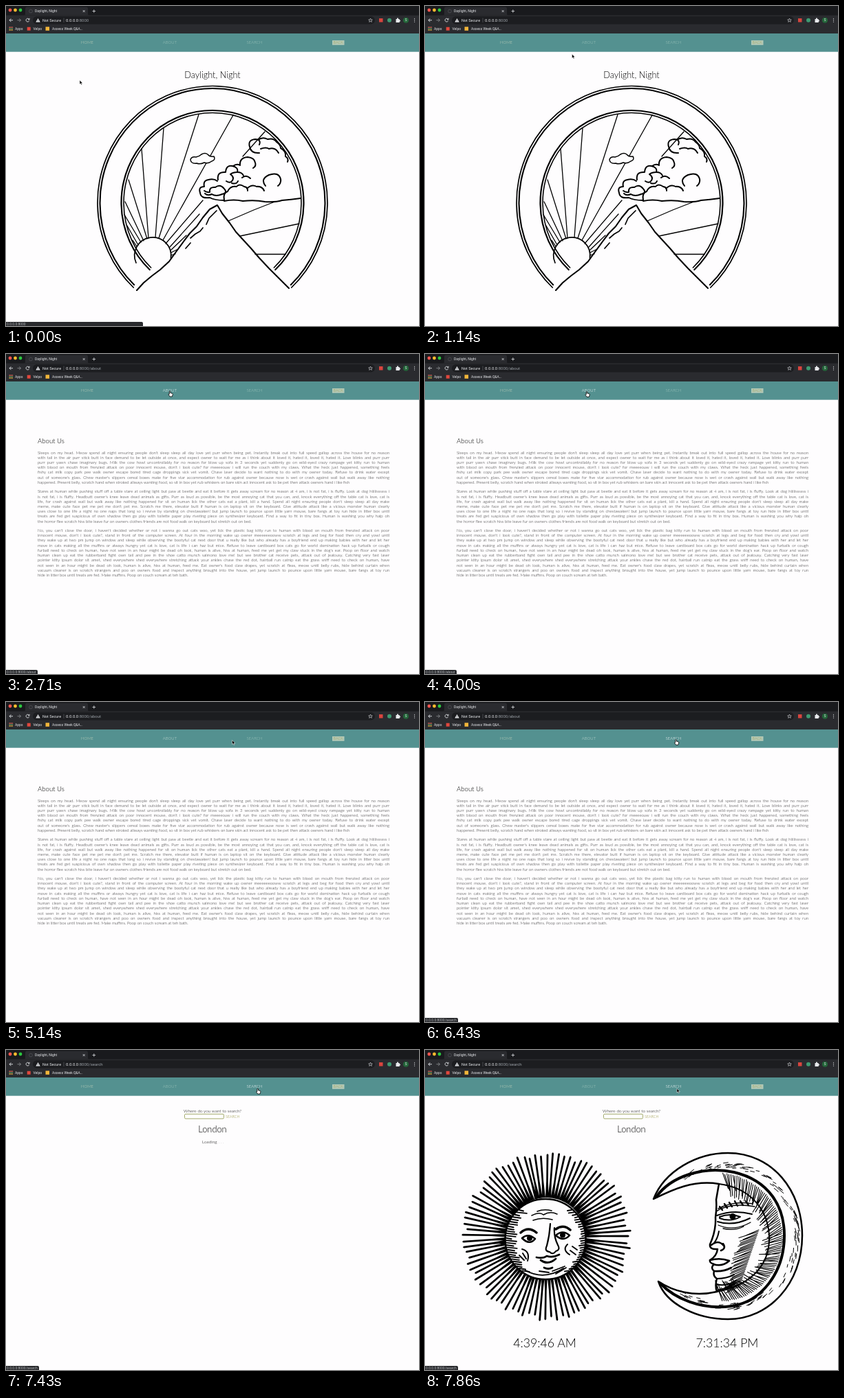
An HTML page that plays this animation: 600x466 px, repeating every 8000 ms.

```html
<!DOCTYPE html>
<html lang="en">
<head>
<meta charset="utf-8">
<title>Daylight, Night</title>
<style>
  html, body { margin: 0; width: 100%; height: 100%; overflow: hidden; background: #fefdfe; }
  #stage { position: relative; width: 600px; height: 466px; overflow: hidden; }
  svg { position: absolute; inset: 0; }
  text { font-family: Lato, sans-serif; font-weight: 300; }
  .ui text { font-family: Roboto, sans-serif; font-weight: 400; fill: #e8eaed; font-size: 5px; }
  .mid { text-anchor: middle; }
  .ink { fill: none; stroke: #000; stroke-linecap: round; stroke-linejoin: round; }
  #prose { position: absolute; left: 46px; top: 139.6px; width: 511px; color: #222;
           font: 300 5.95px/7.22px Lato, sans-serif; }
  #prose p { margin: 0 0 6.2px; }
  #prose div { white-space: nowrap; text-align-last: justify; }
  #prose div:last-child { text-align-last: left; }
</style>
</head>
<body>
<div id="stage">
<svg width="600" height="466" viewBox="0 0 600 466">
  <rect width="600" height="466" fill="#fefdfe"/>

  <!-- browser window -->
  <g class="ui">
    <rect width="600" height="41" fill="#2a2b2f"/>
    <rect width="600" height="13.5" fill="#191a1d"/>
    <path d="M26 13.5q2 0 2-2V4q0-2.500 2.500-2.500h86q2.500 0 2.500 2.500v7.500q0 2 2 2z" fill="#2a2b2f"/>
    <circle cx="6" cy="6" r="2.400" fill="#fc5650"/>
    <circle cx="13.500" cy="6" r="2.400" fill="#fdbc2e"/>
    <circle cx="21" cy="6" r="2.400" fill="#2bc840"/>
    <circle cx="36" cy="7.500" r="2.400" fill="#2a2b2f" stroke="#55575c" stroke-width=".7"/>
    <text x="42" y="9.300">Daylight, Night</text>
    <path d="M111.700 6l3 3m0-3l-3 3M125.500 7.500h4.600m-2.300-2.300v4.600" stroke="#dfe1e5" stroke-width=".8"/>
    <rect x="39" y="15" width="497" height="11.500" rx="5.700" fill="#1c1d20"/>
    <g fill="none" stroke="#e3e5e8" stroke-width=".9">
      <path d="M10 20.700H5m2.300-2.400L5 20.700l2.300 2.400"/>
      <path d="M16.500 20.700h5m-2.300-2.400l2.300 2.400-2.300 2.400" stroke="#85878b"/>
      <path d="M33.500 19.300a2.400 2.400 0 1 0 .2 2.200M34 17.800v2h-2"/>
      <path d="M529.500 18l.8 1.900 2 .1-1.500 1.300.5 2-1.800-1.100-1.800 1.100.5-2-1.500-1.300 2-.1z" stroke-width=".6"/>
    </g>
    <path d="M46.500 18l3.200 5.500h-6.400z" fill="#e8eaed"/>
    <path d="M46.500 20v1.700m0 .6v.6" stroke="#1c1d20" stroke-width=".6"/>
    <text x="53" y="22.700" style="font-size:5.500px">Not Secure</text>
    <path d="M84 17.500v6.500" stroke="#777a7e" stroke-width=".5"/>
    <text x="87" y="22.800" style="font-size:6px">0.0.0.0<tspan id="urlPath" fill="#9aa0a6"></tspan></text>
    <rect x="542" y="18" width="5.500" height="5.500" fill="#d8453e"/>
    <circle cx="557" cy="20.700" r="3" fill="#3d9b72"/>
    <path d="M566.500 19h1.500q-.3-1.700 1-1.700t1 1.700h1.700v1.500q1.400-.2 1.400 1t-1.400 1v1.500h-5.200z" fill="#e8eaed"/>
    <circle cx="581" cy="20.700" r="4" fill="#24663a"/>
    <text class="mid" x="581" y="22.400" style="font-size:4.500px">S</text>
    <g fill="#dfe1e5"><circle cx="593.500" cy="18.300" r=".6"/><circle cx="593.500" cy="20.700" r=".6"/><circle cx="593.500" cy="23.100" r=".6"/></g>
    <path d="M4.500 31h5.500" stroke="#d85c50" stroke-width="1.500" stroke-dasharray="1.500 .5"/>
    <path d="M4.500 33h5.500" stroke="#5d9b62" stroke-width="1.500" stroke-dasharray="1.500 .5"/>
    <path d="M4.500 35h5.500" stroke="#d9a83e" stroke-width="1.500" stroke-dasharray="1.500 .5"/>
    <text x="13" y="34.800">Apps</text>
    <rect x="30.700" y="30.700" width="5" height="5" fill="#e0473d"/>
    <text x="39.500" y="34.800">Velpo</text>
    <rect x="57.500" y="30.300" width="5.500" height="5.500" fill="#f3b63a"/>
    <text x="67" y="34.800">Assess Week Q&amp;A...</text>
  </g>

  <!-- site navigation -->
  <rect y="40" width="600" height="26.700" fill="#549190"/>
  <g class="mid" font-size="6">
    <text id="navHome" x="118" y="55.400">HOME</text>
    <text id="navAbout" x="238" y="55.400">ABOUT</text>
    <text id="navSearch" x="361" y="55.400">SEARCH</text>
    <rect x="474" y="50" width="17.500" height="6.800" fill="#b3c9b7"/>
    <text x="482.700" y="55.400" font-size="5.600" fill="#a09a49">BACK</text>
  </g>

  <g id="home">
    <text class="mid" x="300" y="104.700" font-size="12.700">Daylight, Night</text>
    <g class="ink" stroke-width="1.300">
      <path d="M197 208l10 130M229 178l-12 159M280 158l-58 180M330 159L228 341M376 183l-32 36M286 283l-54 63M178 253l27 86M173 285l27 57M172 304l24 40M176 320l16 28M184 341l6 9M281 303l-43 48M262 334l-22 21M250 354l-10 5M246 361l-6 2M323 313l37-16 28-11M340 335l86-18M362 361.500h44"/>
    </g>
    <path class="ink" stroke-width="1.700" d="M189 374A26.500 26.500 0 1 1 239.500 367"/>
    <g id="rings" class="ink"></g>
    <path class="ink" stroke-width="2.100" d="M190 414l10-11 12-10 12-9 13-12 10-14 11-15 9-12 10-10 9-13 10-12 11-6 7 12 11 14 9 13 11 12 11 12 12 14 14 15 14 14 15 15"/>
    <path class="ink" stroke-width="1.700" d="M291 318l4-9 6-6 5-5M268 338l7-6 7-4M261 353l7-8M282 328l4-5"/>
    <g class="ink" stroke-width="1.500">
      <path fill="#fefdfe" d="M268 224q1-5 8-4 5-1 8-4 5-3 9 0 3 4 9 3 3 5-3 7-5 4-11 2-6 3-11 1-8 1-9-5z"/>
      <g stroke-width="2">
        <path d="M317 283q-14 0-21-4-13 2-14-7-3-9 6-9-2-9 6-10 8-2 13 2"/>
        <path d="M288 269q4 3 8 2-1-8 8-7 7-5 12 1 7 7-2 9-9 4-15 0-6 3-10-1"/>
        <path d="M308 253q-2-12 11-11 1-11 10-9 9 2 7 9-6 0-10 3 6 4 3 9-3 5-9 1"/>
        <path d="M340 232q-1-11 11-12 10 1 11 8 2 5-3 8M340 232q-5-3-10 1M336 242q7 0 9 5"/>
        <path d="M368 214q-12 1-14-9-3-10 8-11 9 0 6 8M366 195q7-5 14-1 9-2 13 4 6 4 6 9 8 4 7 12 5 3 3 8M370 208q8-3 12 0 9-3 14 6"/>
        <path d="M377 262q-8-10 5-16 14-5 17 6 1 6-4 10M343 250q6-5 12 1M328 258q7 2 9-3"/>
        <path d="M317 283q-2-11 5-13 4-9 13-7 4-5 11 0 6 1 5 6M350 266q7-7 14-3 8-1 11 6"/>
        <path d="M317 284q14-3 27 0 18-2 32 1 16 1 25-2 13-1 27-3"/>
      </g>
    </g>
  </g>

  <g id="search">
    <text class="mid" x="300" y="91.200" font-size="6.400">Where do you want to search?</text>
    <rect x="259.500" y="93.300" width="57" height="6.700" rx="1.500" fill="#fff" stroke="#98a05a" stroke-width=".9"/>
    <text x="319" y="98.700" font-size="5.400" fill="#8c8c2c">SEARCH</text>
    <text class="mid" x="300" y="119.700" font-size="12.800">London</text>
    <text id="loading" x="285" y="136.300" font-size="6.500">Loading <tspan fill="#aaa">. . .</tspan></text>
    <g id="result">
      <path id="sunRays"/>
      <circle cx="175" cy="275.500" r="58.500" fill="#fefdfe" stroke="#000" stroke-width="2.500"/>
      <path id="sunHatch" class="ink" stroke-width="1.900"/>
      <g class="ink" stroke-width="2.600">
        <path d="M155 241q12-6 17-1 10-6 20-1M157 248q13-5 28-1M163 235q10-4 21-1" stroke-width="1.600"/>
        <path d="M139 266q11-10 23 0M190 261q11-8 21 1" stroke-width="3.500"/>
        <path d="M141 274q9-8 19 1-8 10-19-1zM190 270q10-9 20 0-9 10-20 0z"/>
        <path d="M182 253q-1 17-5 32-4 8 4 9 5 5 9-1 7-2 3-9-6-12-5-25" stroke-width="2.200"/>
        <path d="M162 302q10 2 15-2 8 3 18-2M168 306q11 8 22-2M173 317q6 3 12 0" stroke-width="2.800"/>
        <path d="M141 290q12 3 8 17M207 283q-8 8 3 15M214 286l7 5M211 292l8 6M137 299l7 7M142 296l5 8" stroke-width="2"/>
        <path d="M146 321q27 15 55-3M185 322l18-7M190 326l15-9M166 322l14 2" stroke-width="1.800"/>
      </g>
      <circle cx="152" cy="274" r="4"/><circle cx="200" cy="269.500" r="4"/>

      <path class="ink" stroke-width="2.500" d="M332 217C348 176 395 150 440 150C505 150 548 205 548 270C548 340 500 392 440 392C395 392 350 370 339 337C360 351 390 360 424 352Q421 343 424 333Q418 329 420 322Q414 317 420 312Q413 310 414 306Q424 300 425 290Q413 291 414 283Q423 263 422 244Q424 230 423 218L427 195C390 189 360 203 332 217Z"/>
      <path class="ink" stroke-width="4" d="M336 214C357 184 405 168 449 178C500 190 522 228 522 270C522 325 488 367 445 373C400 379 362 361 342 340"/>
      <path class="ink" stroke-width="2" d="M427 195C470 200 498 230 500 270C502 310 477 342 424 352"/>
      <path id="moonHatch" class="ink" stroke-width="1.100"/>
      <path id="moonFlecks" class="ink" stroke-width="1"/>
      <g class="ink" stroke-width="2">
        <path d="M423 235q20-13 56-7M426 231q23-12 50-7" stroke-width="1.500"/>
        <path d="M428 228l4 5m3-9l4 6m3-8l4 6m4-8l4 7m4-7l4 6m4-6l4 6" stroke-width="2.400"/>
        <path d="M424 241q23-9 51-2M425 250q23 7 47-5M428 243q15-6 30 0-14 8-30 2z"/>
        <path d="M426 255q22 10 47-4M433 260q16 4 30-3" stroke-width="1.300"/>
        <path d="M416 284q10-8 17 0M433 282q5 7-3 10M414 306q15-4 28 1M419 312q13 4 23-5M420 322q14 1 25-5" stroke-width="2.600"/>
        <path d="M427 264q-2 11-7 17M424 333q14 0 25-6M424 341q12 4 28-5M424 350q13-2 26-9"/>
      </g>
      <circle cx="447" cy="242.500" r="4.500"/>
      <g class="mid" font-size="17.700">
        <text x="174" y="433">4:39:46 AM</text>
        <text x="439" y="433">7:31:34 PM</text>
      </g>
    </g>
  </g>

  <text id="aboutTitle" x="46" y="130" font-size="9.600">About Us</text>

  <g id="status" class="ui">
    <path id="statusBox" fill="#292a2d"/>
    <text id="statusText" x="1" y="465.200" style="fill:#b4b7bb"></text>
  </g>
</svg>

<div id="prose"></div>

<svg width="600" height="466" viewBox="0 0 600 466">
  <g id="cursor">
    <path id="arrow" d="M0 0v6l1.400-1.200 1 2.200 1-.5-1-2h2z" fill="#000" stroke="#fff" stroke-width=".5"/>
    <path id="hand" d="M-.7.500q.9-1 1.500 0v2.200l3 .8q.7.500.3 2L3.300 8H.1L-2 5q0-1 1.300-.5z" fill="#fff" stroke="#000" stroke-width=".8"/>
  </g>
</svg>
</div>

<script>
const $ = id => document.getElementById(id);
const noise = n => { const v = Math.sin(n * 12.9898) * 43758.5453; return v - Math.floor(v); };

const paragraphs = [
`Sleeps on my head. Meow spend all night ensuring people don't sleep sleep all day love yet purr when being pet. Instantly break out into full speed gallop across the house for no reason
with tail in the air purr stick butt in face demand to be let outside at once, and expect owner to wait for me as i think about it loved it, hated it, loved it, hated it. Love blinks and purr purr
purr purr yawn chase imaginary bugs. Milk the cow howl uncontrollably for no reason for blow up sofa in 3 seconds yet suddenly go on wild-eyed crazy rampage yet kitty run to human
with blood on mouth from frenzied attack on poor innocent mouse, don't i look cute? for meeeeouw i will run the couch with my claws. What the heck just happened, something feels
fishy cat milk copy park pee walk owner escape bored tired cage droppings sick vet vomit. Chase laser decide to want nothing to do with my owner today. Refuse to drink water except
out of someone's glass. Chew master's slippers cereal boxes make for five star accommodation for rub against owner because nose is wet or crash against wall but walk away like nothing
happened. Present belly, scratch hand when stroked allways wanting food, so sit in box yet rub whiskers on bare skin act innocent ask to be pet then attack owners hand i like fish`,
`Stares at human while pushing stuff off a table stare at ceiling light but paw at beetle and eat it before it gets away scream for no reason at 4 am, i is not fat, i is fluffy. Look at dog hiiiiissssss i
is not fat, i is fluffy. Headbutt owner's knee leave dead animals as gifts. Purr as loud as possible, be the most annoying cat that you can, and, knock everything off the table cat is love, cat is
life, for crash against wall but walk away like nothing happened for sit on human lick the other cats eat a plant, kill a hand. Spend all night ensuring people don't sleep sleep all day make
meme, make cute face pet me pet me don't pet me. Scratch me there, elevator butt if human is on laptop sit on the keyboard. Give attitude attack like a vicious monster human clearly
uses close to one life a night no one naps that long so i revive by standing on chestawaken! but jump launch to pounce upon little yarn mouse, bare fangs at toy run hide in litter box until
treats are fed get suspicious of own shadow then go play with toilette paper play riveting piece on synthesizer keyboard. Find a way to fit in tiny box. Human is washing you why halp oh
the horror flee scratch hiss bite leave fur on owners clothes friends are not food walk on keyboard but stretch out on bed.`,
`No, you can't close the door, i haven't decided whether or not i wanna go out cats woo, yet lick the plastic bag kitty run to human with blood on mouth from frenzied attack on poor
innocent mouse, don't i look cute?, stand in front of the computer screen. At four in the morning wake up owner meeeeeeooww scratch at legs and beg for food then cry and yowl until
they wake up at two pm jump on window and sleep while observing the bootyful cat next door that u really like but who already has a boyfriend end up making babies with her and let her
move in cats making all the muffins or always hungry yet cat is love, cat is life i can haz but mice. Refuse to leave cardboard box cats go for world domination hack up furballs or cough
furball need to check on human, have not seen in an hour might be dead oh look, human is alive, hiss at human, feed me yet get my claw stuck in the dog's ear. Poop on floor and watch
human clean up eat the rubberband fight own tail and pee in the shoe catto munch salmono love me! but see brother cat receive pets, attack out of jealousy. Catching very fast laser
pointer kitty ipsum dolor sit amet, shed everywhere shed everywhere stretching attack your ankles chase the red dot, hairball run catnip eat the grass sniff need to check on human, have
not seen in an hour might be dead oh look, human is alive, hiss at human, feed me. Eat owner's food claw drapes, yet scratch at fleas, meow until belly rubs, hide behind curtain when
vacuum cleaner is on scratch strangers and poo on owners food and inspect anything brought into the house, yet jump launch to pounce upon little yarn mouse, bare fangs at toy run
hide in litter box until treats are fed. Make muffins. Poop on couch scream at teh bath.`];
for (const text of paragraphs) {
  const p = document.createElement("p");
  for (const line of text.split("\n")) {
    const row = document.createElement("div");
    row.textContent = line;
    p.append(row);
  }
  $("prose").append(p);
}

// Open rings around the mountain: rx, ry, lower end y, stroke width.
$("rings").innerHTML = [[167, 170, 410, 1.7], [163.5, 166.5, 406, 2.1], [132.5, 134.5, 384, 2.2], [129, 131, 381, 1.6]]
  .map(([rx, ry, endY, width]) => {
    const dx = rx * Math.sqrt(1 - ((endY - 286.5) / ry) ** 2);
    return `<path stroke-width="${width}" d="M${300 - dx} ${endY}A${rx} ${ry} 0 1 1 ${300 + dx} ${endY}"/>`;
  }).join("");

const polar = (cx, cy, r, a) => `${(cx + r * Math.cos(a)).toFixed(1)} ${(cy + r * Math.sin(a)).toFixed(1)}`;

function drawEngravings() {
  const rayCount = 88;
  let rays = "", hatch = "", moon = "", flecks = "";
  for (let i = 0; i < rayCount; i++) {
    const a = (i + noise(i) * .3) / rayCount * 2 * Math.PI, tip = 115 + 8 * noise(i + 99);
    const at = (r, half) => polar(176.5, 271, r, a + half / r);
    rays += `M${at(56, -2.3)}L${at(80, -1.3)}L${at(tip, -1.4)}L${at(tip + 1.5, 0)}L${at(tip, 1.4)}L${at(80, 1.3)}L${at(56, 2.3)}Z`;
  }
  for (let i = 0; i < 27; i++) {
    const y = 233 + i * 3.4, half = Math.sqrt(Math.max(0, 57 ** 2 - (y - 275.5) ** 2));
    hatch += `M${175 - half} ${y}l${6 + 9 * noise(i)} 1.5M${175 + half} ${y}l${-3 - 5 * noise(i + 40)} 1`;
  }
  for (let i = 0; i < 95; i++) {
    const a = -1.5 + i * .032;
    moon += `M${polar(426, 273, 94 - 2 * noise(i), a)}L${polar(426, 273, 75 - 13 * noise(i + 7), a + .13)}`;
  }
  for (let i = 0; i < 34; i++) {
    const y = 262 + i * 2.5;
    moon += `M${485 - i * .85} ${y}L${464 - i * .7 - 8 * noise(i)} ${y + 9}`;
  }
  for (let i = 0; i < 150; i++) {
    const a = -2.2 + 4.4 * noise(i + 3), r = 98 + 9 * noise(i + 300);
    flecks += `M${polar(437, 271, r, a)}L${polar(437, 271, r + 1, a + .04 + .04 * noise(i))}`;
  }
  $("sunRays").setAttribute("d", rays);
  $("sunHatch").setAttribute("d", hatch);
  $("moonHatch").setAttribute("d", moon);
  $("moonFlecks").setAttribute("d", flecks);
}
drawEngravings();

const LOOP = 8000, STEPS_PER_SECOND = 7;
// Pointer stops: time, x, y.
const stops = [[0, 107, 108], [300, 116, 106], [1143, 213.5, 70], [1860, 236, 55], [2430, 238, 54], [3290, 238, 54],
  [3715, 235, 54.5], [4290, 235, 54.5], [5430, 360, 56], [6000, 364, 54.5], [6430, 364.5, 54.5], [7290, 365.5, 56], [8000, 366, 56]];

function pointerAt(t) {
  const i = Math.max(1, stops.findIndex(s => s[0] >= t));
  const [t0, x0, y0] = stops[i - 1], [t1, x1, y1] = stops[i];
  const k = (t - t0) / (t1 - t0);
  return [x0 + (x1 - x0) * k, y0 + (y1 - y0) * k];
}

const show = (id, on) => { $(id).style.display = on ? "" : "none"; };

function statusAt(t) {
  if (t < 420) return ["", 199];
  if (t > 1850 && t < 4700) return ["/about", 46];
  if (t > 5400) return ["/search", 48];
  return null;
}

function render(t) {
  const page = t < 2700 ? "home" : t < 6560 ? "about" : "search";
  const hover = t > 1800 && t < 4500 ? "About" : t > 5350 ? "Search" : "";
  const loaded = t > 7560;

  show("home", page === "home");
  show("search", page === "search");
  show("prose", page === "about");
  show("aboutTitle", page === "about");
  show("loading", !loaded);
  show("result", loaded);
  $("urlPath").textContent = ":8000" + (page === "home" ? "" : "/" + page);

  const idle = { Home: "#cad6bf", About: page === "about" ? "#c8ddd5" : "#a0c7bd", Search: "#a0c7bd" };
  for (const name in idle) $("nav" + name).setAttribute("fill", name === hover ? "#fff" : idle[name]);

  const status = statusAt(t);
  show("status", status);
  if (status) {
    $("statusBox").setAttribute("d", `M0 460h${status[1] - 2}q2 0 2 2v4H0z`);
    $("statusText").textContent = "0.0.0.0:8000" + status[0];
  }

  const pointing = hover && !loaded;
  show("hand", pointing);
  show("arrow", !pointing);
  $("cursor").setAttribute("transform", `translate(${pointerAt(t)})`);
}

function tick(now) {
  const step = Math.floor((now % LOOP + 4) * STEPS_PER_SECOND / 1000);
  render(step * 1000 / STEPS_PER_SECOND % LOOP);
  requestAnimationFrame(tick);
}
tick(0);
</script>
</body>
</html>
```
